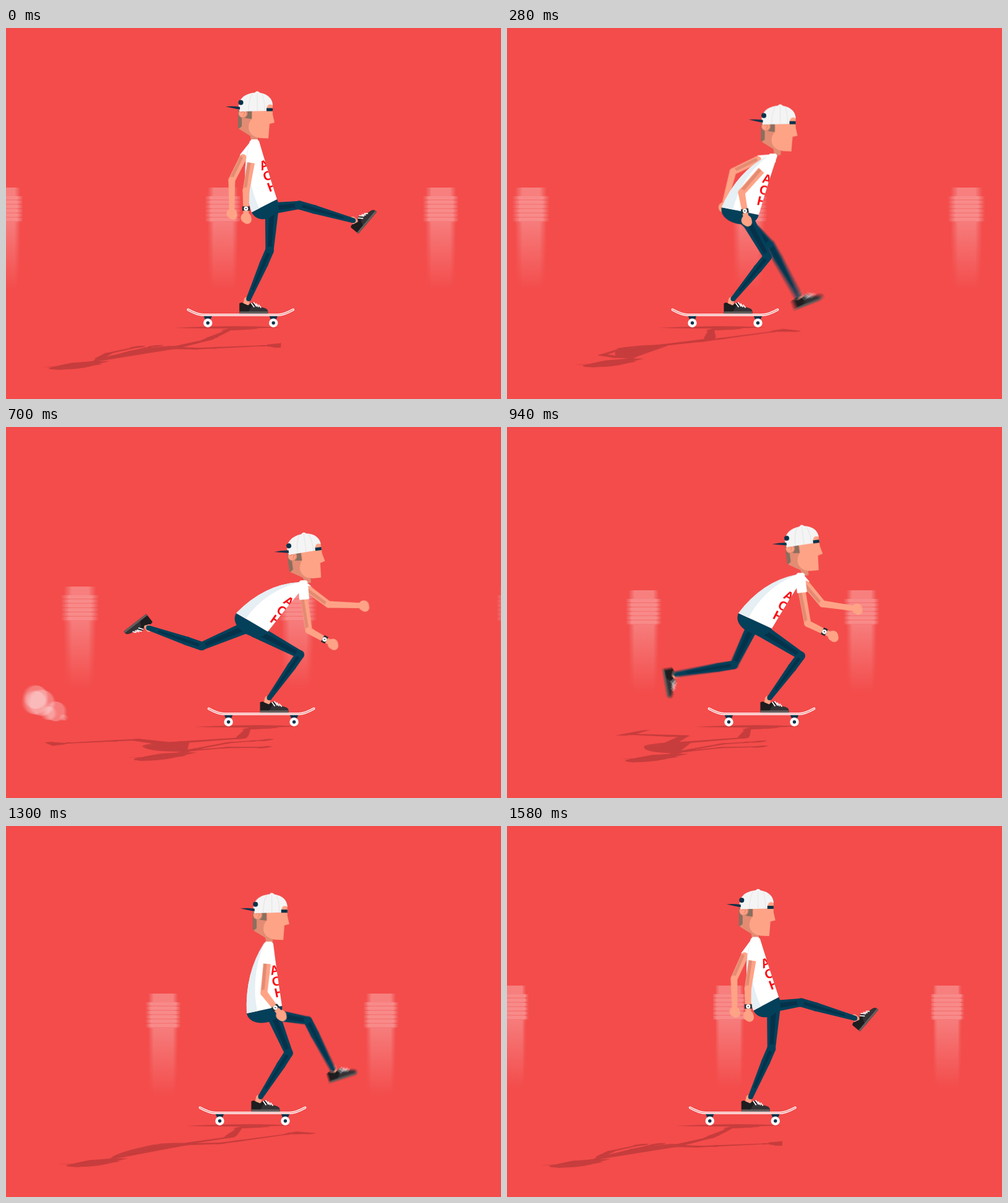
An HTML page with a canvas that plays this animation: 800x600 px, repeating every 1.6 s.

```html
<!DOCTYPE html>
<html lang="en">
<head>
<meta charset="utf-8">
<title>Skater</title>
<style>
html, body { margin: 0; width: 100%; height: 100%; overflow: hidden; background: #f34c4b; }
canvas { display: block; }
</style>
</head>
<body>
<canvas id="stage" width="800" height="600"></canvas>
<script>
const LOOP = 1600, SHUTTER = 10, SAMPLES = 6;
const RED = '#f34c4b', SHADE = '#c73d3d', NAVY = '#04405a', DEEP = '#05324a';
const SKIN = '#ffa386', DARK_SKIN = '#e38b73', WHITE = '#fff';

const screen = document.getElementById('stage').getContext('2d');
const buffer = document.createElement('canvas');
buffer.width = 800;
buffer.height = 600;
const c = buffer.getContext('2d');

// Poses share these times; the pillars need one more near the end.
const TIMES = [0, 280, 460, 700, 940, 1300];
const PILLAR_TIMES = [...TIMES, 1580];
const pillarX = [352, 40, -200, -583, -834, -1153, -1400];
const pillarY = [258, 258, 258, 258, 264, 271, 258];
const boardX = [379.3, 352.5, 365.5, 412.5, 411.5, 398.5];
const points = {
  neck: [[402, 430, 437, 481, 475, 425], [180, 203, 242, 248, 236, 187]],
  back: [[397, 347, 331, 372, 374, 389], [298, 290, 298, 301, 301, 303]],
  front: [[438, 407, 383, 423, 428, 446], [277, 302, 326, 331, 326, 291]],
  knee: [[426, 421, 431, 475, 475, 457], [360, 370, 368, 368, 370, 367]],
  sleeve: [[396, 411, 427, 482, 477, 422], [218, 230, 274, 279, 268, 223]],
  elbow: [[388, 379, 407, 489, 486, 417], [263, 266, 319, 329, 318, 270]],
  hand: [[388, 387, 434, 528, 527, 445], [307, 311, 356, 351, 338, 306]],
  farSleeve: [[383, 405, 427, 489, 484, 424], [210, 213, 270, 263, 255, 218]],
  farElbow: [[365, 365, 420, 521, 510, 419], [246, 232, 309, 287, 286, 262]],
  farHand: [[365, 350, 461, 578, 566, 438], [300, 290, 338, 289, 294, 298]],
  head: [[0, 35.5, 39, 80, 75, 24], [0, 21, 63, 68, 56, 6]]
};
const angles = {
  thigh: [-7, 44, 130, 157, 116, 10],
  shin: [16, 61, 169, 199, 171, 63],
  foot: [-50, -22, 65, 142, 80, -18],
  tilt: [0, 0, -7, -8, -7.5, -0.5]
};
const thighLength = [54, 69, 82, 85, 73, 70];
const shinLength = [91, 94, 93, 91, 95, 88];

// Smooth curve through looping keys; drift is the change per loop.
function track(values, t, times = TIMES, drift = 0) {
  const n = values.length;
  const time = i => times[(i + n) % n] + LOOP * Math.floor(i / n);
  const value = i => values[(i + n) % n] + drift * Math.floor(i / n);
  const slope = i => (value(i + 1) - value(i - 1)) / (time(i + 1) - time(i - 1));
  let i = n - 1;
  while (times[i] > t) i--;
  const span = time(i + 1) - time(i), p = (t - time(i)) / span, q = 1 - p;
  return value(i) * (1 + 2 * p) * q * q + value(i + 1) * (3 - 2 * p) * p * p +
    span * p * q * (slope(i) * q - slope(i + 1) * p);
}

const mix = (a, b, k) => [a[0] + (b[0] - a[0]) * k, a[1] + (b[1] - a[1]) * k];
const add = (a, x, y) => [a[0] + x, a[1] + y];
const polar = (a, length, angle) => add(a, length * Math.cos(angle), length * Math.sin(angle));

let flat = null; // a single colour while drawing the cast shadow
function fill(color, shape) {
  c.fillStyle = flat || color;
  c.fill(typeof shape === 'string' ? new Path2D(shape) : shape);
}
function stroke(color, width, shape) {
  c.strokeStyle = flat || color;
  c.lineWidth = width;
  c.stroke(new Path2D(shape));
}
function disc(color, [x, y], r) {
  const shape = new Path2D();
  shape.arc(x, y, r, 0, 7);
  fill(color, shape);
}
function limb(color, a, ra, b, rb, round = true) {
  const angle = Math.atan2(b[1] - a[1], b[0] - a[0]), turn = Math.PI / 2;
  const corners = [polar(a, ra, angle - turn), polar(b, rb, angle - turn),
    polar(b, rb, angle + turn), polar(a, ra, angle + turn)];
  fill(color, `M${corners.join('L')}Z`);
  if (round) {
    disc(color, a, ra);
    disc(color, b, rb);
  }
}
function at([x, y], angle, draw) {
  c.save();
  c.translate(x, y);
  c.rotate(angle);
  draw();
  c.restore();
}

function getPose(t) {
  const pose = { board: track(boardX, t) };
  for (const k in points) pose[k] = points[k].map(v => track(v, t));
  for (const k in angles) pose[k] = track(angles[k], t) * Math.PI / 180;
  const { back, front } = pose;
  const belt = Math.atan2(front[1] - back[1], front[0] - back[0]);
  pose.down = belt + Math.PI / 2;
  pose.hip = polar(mix(back, front, .5), 6, pose.down);
  pose.kickKnee = polar(pose.hip, track(thighLength, t), pose.thigh);
  pose.kickAnkle = polar(pose.kickKnee, track(shinLength, t), pose.shin);
  return pose;
}

function shoe(ankle, angle) {
  at(ankle, angle, () => {
    limb(SKIN, [1, -2], 4.5, [0, 6], 5);
    fill('#1d1d1f', 'M-11 4Q-7 1-4 4L3 7 9 2 17 7C22 12 34 9 35 17V20H-11Z');
    fill('#333336', 'M2 20L9 8 17 7C22 12 34 9 35 17V20Z');
    fill('#65615f', 'M-11 17H35V20H-11Z');
    if (!flat) stroke(WHITE, 1.7, 'M8 3l5 7M12 2l5 7M16 4l4 6M20 6l4 5');
  });
}

function leg(hip, knee, ankle, rootRadius) {
  limb(NAVY, hip, rootRadius, knee, 6.5);
  limb(DEEP, mix(hip, knee, .15), 4, knee, 3);
  const calf = mix(knee, ankle, .28);
  limb(NAVY, knee, 7, calf, 7);
  limb(NAVY, calf, 7, ankle, 4);
  limb(DEEP, mix(knee, ankle, .08), 2.5, mix(knee, ankle, .8), 1.5);
}

function arm(sleeve, elbow, hand) {
  limb(SKIN, sleeve, 6, elbow, 5.5);
  limb(DARK_SKIN, add(sleeve, -3, 0), 2.5, add(elbow, -2, 0), 2.5);
  limb(SKIN, elbow, 5.5, hand, 4.2);
  disc(SKIN, hand, 8.5);
  disc(SKIN, add(hand, 2, 3), 7);
}

function torso({ neck, back, front, down }) {
  const dx = neck[0] - back[0], dy = neck[1] - back[1], length = Math.hypot(dx, dy);
  const bend = add(mix(back, neck, .5), dy / length * 22, -dx / length * 22);
  const collar = add(neck, -8, 3), chest = add(mix(front, neck, .55), 3, 1);
  fill(NAVY, `M${back}C${polar(back, 28, down)} ${polar(front, 28, down)} ${front}Z`);
  const shirt = new Path2D(
    `M${collar}Q${bend} ${back}L${front}Q${chest} ${add(neck, 7, 3)}L${add(neck, 4, 0)}L${add(neck, -5, 0)}Z`);
  fill(WHITE, shirt);
  if (flat) return;
  const hem = mix(back, front, .3);
  fill('#e5eff4', `M${collar}Q${bend} ${back}L${hem}Q${mix(bend, front, .15)} ${collar}Z`);
  c.save();
  c.clip(shirt);
  c.fillStyle = '#f80d12';
  c.font = '900 21px Arial, "Liberation Sans", sans-serif';
  c.textAlign = 'center';
  c.textBaseline = 'middle';
  const rise = Math.atan2(neck[1] - front[1], neck[0] - front[0]);
  [...'HOA'].forEach((letter, i) =>
    at(polar(front, 21 + i * 18.5, rise), rise + Math.PI / 2, () => c.fillText(letter, 0, 0)));
  c.restore();
}

function head({ head: [x, y], tilt }) {
  at([405 + x, 140 + y], tilt, () => {
    c.translate(-405, -140);
    fill(DARK_SKIN, 'M394 170L407 174 407 184Q401 186 396 182Z');
    fill('#87705f', 'M375 133H399V150L381 163 375 162Z');
    fill(DARK_SKIN, 'M381 144L389 146 397 147V133H410V177L397 176 376 163 381 159Z');
    fill(SKIN, 'M398 133V146Q391 153 392 163 395 176 411 178L424 178.5 426 155 434 153 431 140V122H420V133Z');
    disc(DARK_SKIN, [383, 138], 7.5);
    disc(SKIN, [382.5, 138], 6);
    stroke(DARK_SKIN, 1.3, 'M380 137Q383 133 386 137L383 142');
    fill('#f4f4f4', 'M376 131C375 113 387 106 402 104.5Q406 100 410 104.5C424 107 431 115 431 125 424 121 421 126 421 134L378 135Z');
    if (!flat) stroke('#e6e6e7', 1, 'M406 105V134M398 106Q392 116 392 134M414 107Q418 116 418 134');
    fill(DEEP, 'M355 127Q366 126 378 127.5V132Z');
    fill(DEEP, 'M421 129.5H431V134.5H421Z');
    disc(DEEP, [379.5, 120.5], 4);
  });
}

function figure(p) {
  limb(WHITE, add(p.neck, -1, 9), 8, p.farSleeve, 7, false);
  arm(p.farSleeve, p.farElbow, p.farHand);
  shoe(p.kickAnkle, p.foot);
  leg(p.hip, p.kickKnee, p.kickAnkle, 10);
  shoe([p.board + 9, 441.5], 0);
  const root = polar(mix(p.back, p.front, .7), 9, p.down);
  leg(root, p.knee, [p.board + 13, 438], 11);
  head(p);
  torso(p);
  arm(p.sleeve, p.elbow, p.hand);
  limb(WHITE, add(p.neck, -1, 7), 8, p.sleeve, 8, false);
  const turn = Math.atan2(p.hand[1] - p.elbow[1], p.hand[0] - p.elbow[0]);
  at(mix(p.elbow, p.hand, .66), turn, () => {
    fill('#222a30', 'M-3.5-6H3.5V6H-3.5Z');
    disc(WHITE, [0, 0], 3.6);
    disc('#222a30', [0, 0], 1);
  });
}

function skateboard(x) {
  at([x, 0], 0, () => {
    for (const side of [-53, 53]) {
      fill(DEEP, `M${side - 7} 465h14l-3 7h-8Z`);
      disc(WHITE, [side, 477], 7.2);
      disc(DEEP, [side, 477], 2.7);
    }
    c.lineCap = c.lineJoin = 'round';
    const deck = 'M-85 455.5Q-70 464-60 464H60Q70 464 85 455.5';
    stroke(WHITE, 3.8, deck);
    stroke('#ee6b68', 1.2, deck);
    c.lineCap = 'butt';
  });
}

const fade = c.createLinearGradient(0, 55, 0, 166);
fade.addColorStop(0, 'rgba(255,255,255,.27)');
fade.addColorStop(1, 'rgba(255,255,255,0)');
function pillars(t) {
  const x = track(pillarX, t, PILLAR_TIMES, -1760);
  const y = track(pillarY, t, PILLAR_TIMES);
  const start = ((x % 352) + 352) % 352 - 352;
  for (let left = start; left < 860; left += 352) {
    at([left, y], 0, () => {
      c.fillStyle = 'rgba(255,255,255,.29)';
      c.fillRect(-20, 0, 40, 14);
      for (let i = 0; i < 6; i++) {
        c.fillStyle = 'rgba(255,255,255,.35)';
        c.fillRect(-24.5, 14 + i * 7, 49, 5.5);
        c.fillStyle = 'rgba(255,255,255,.25)';
        c.fillRect(-22, 19.5 + i * 7, 44, 1.5);
      }
      c.fillStyle = fade;
      c.fillRect(-20, 56, 40, 110);
    });
  }
}

// Each puff: x, y, radius shortly after the push, then 240 ms later.
const puffs = [[207, 473, 7, 49, 437, 19], [214, 475, 7, 58, 446, 21], [224, 477, 6, 48, 446, 19],
  [234, 478, 6, 81, 460, 16], [241, 478, 4, 70, 463, 11], [253, 479, 5, 94, 470, 5]];
function dust(t) {
  if (t < 385 || t > 1000) return;
  const k = (t - 460) / 240;
  for (const [x, y, r, x2, y2, r2] of puffs) {
    const radius = Math.min((t - 385) / 75, 1) * Math.max(0, r + (r2 - r) * k);
    disc('rgba(255,255,255,.27)', mix([x, y], [x2, y2], k), radius);
  }
}

function scene(t) {
  c.fillStyle = RED;
  c.fillRect(0, 0, 800, 600);
  pillars(t);
  const pose = getPose(t);
  flat = SHADE;
  c.save();
  c.transform(1, 0, .85, -.187, -408, 572);
  figure(pose);
  c.restore();
  fill(SHADE, `M${pose.board - 107} 485Q${pose.board} 480 ${pose.board + 64} 484.5Q${pose.board} 487 ${pose.board - 107} 485Z`);
  flat = null;
  dust(t);
  skateboard(pose.board);
  figure(pose);
}

// Averaging several moments inside the shutter time gives the motion blur.
function frame() {
  const now = performance.now();
  for (let i = 0; i < SAMPLES; i++) {
    const offset = ((i + .5) / SAMPLES - .5) * SHUTTER;
    scene((now + offset + LOOP) % LOOP);
    screen.globalAlpha = 1 / (i + 1);
    screen.drawImage(buffer, 0, 0);
  }
  requestAnimationFrame(frame);
}
frame();
</script>
</body>
</html>
```
